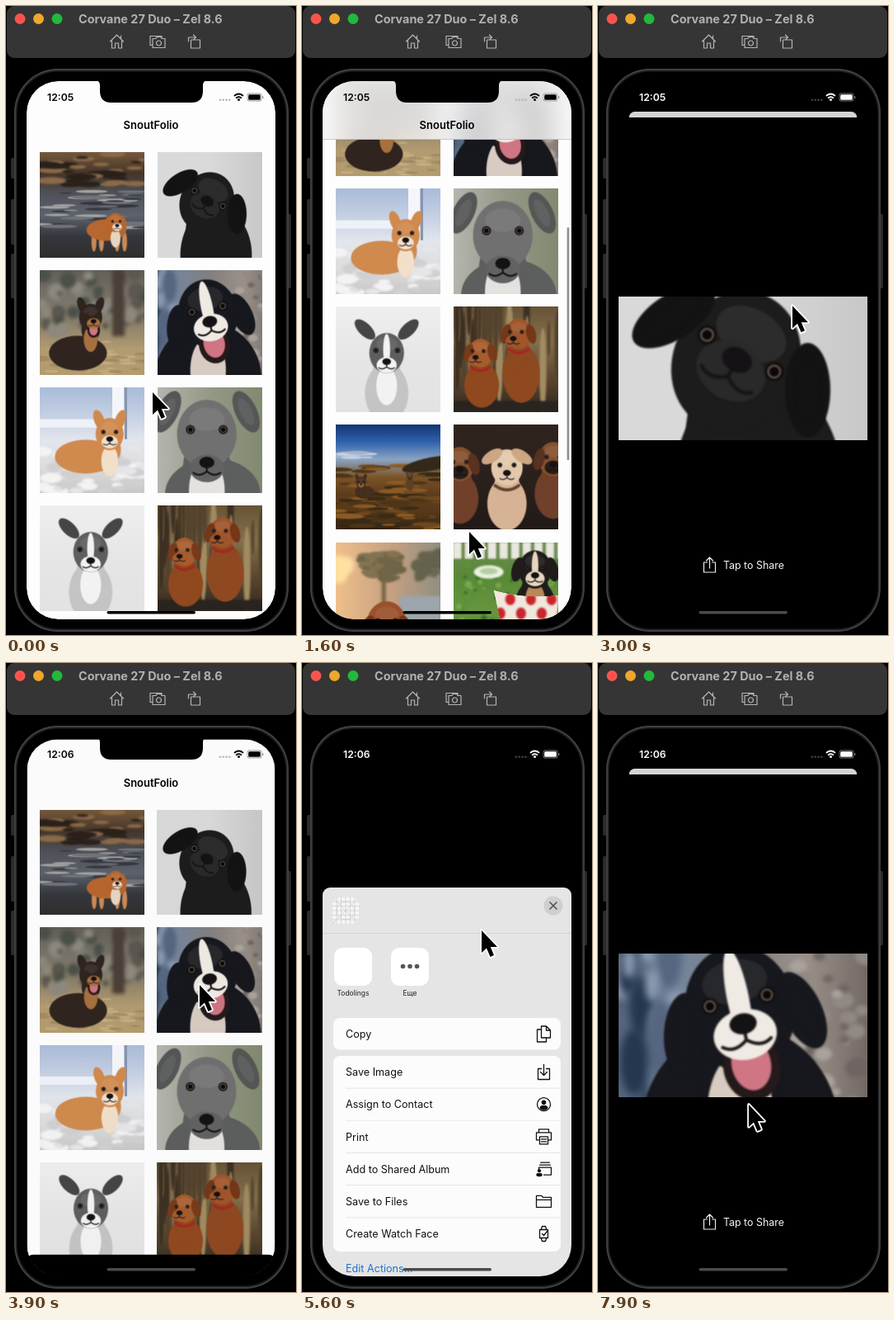
An HTML page with a canvas that plays this animation: 352 px wide and 762 px high, repeating every 8000 ms.

```html
<!DOCTYPE html>
<html lang="en">
<head>
<meta charset="utf-8">
<title>Dog gallery</title>
<style>
html, body { margin: 0; width: 100%; height: 100%; overflow: hidden; background: #000; }
canvas { display: block; width: 352px; height: 762px; }
</style>
</head>
<body>
<canvas id="stage" width="352" height="762"></canvas>
<script>
const stage = document.getElementById('stage').getContext('2d');
let c = stage, unit = 1, seed = 1;

// Drawing helpers
const oval = (fill, x, y, rx, ry = rx, rot = 0) => {
  c.fillStyle = fill;
  c.beginPath();
  c.ellipse(x, y, rx, ry, rot, 0, 7);
  c.fill();
};
const rect = (fill, x, y, w, h, r = 0) => {
  c.fillStyle = fill;
  c.beginPath();
  c.roundRect(x, y, w, h, r);
  c.fill();
};
const clipTo = (x, y, w, h, r) => {
  c.beginPath();
  c.roundRect(x, y, w, h, r);
  c.clip();
};
const line = (color, width, d, x = 0, y = 0) => {
  c.save();
  c.translate(x, y);
  c.strokeStyle = color;
  c.lineWidth = width;
  c.lineJoin = c.lineCap = 'round';
  c.stroke(new Path2D(d));
  c.restore();
};
const text = (str, x, y, size, color, weight = 400, align = 'left') => {
  c.font = `${weight} ${size}px Inter, sans-serif`;
  c.textAlign = align;
  c.fillStyle = color;
  c.fillText(str, x, y);
};
const blur = n => c.filter = n ? `blur(${n * unit}px)` : 'none';
const random = () => (seed = seed * 16807 % 2147483647) / 2147483647;

// Photo parts, on a square with sides of SIDE
const SIDE = 127;
const gradient = (x, y, colors) => {
  const g = c.createLinearGradient(0, 0, x, y);
  colors.forEach((k, i) => g.addColorStop(i / (colors.length - 1), k));
  rect(g, 0, 0, SIDE, SIDE);
};
const down = (...colors) => gradient(0, SIDE, colors);
const across = (...colors) => gradient(SIDE, 0, colors);
const scatter = (n, colors, top, height, rx, ry = rx, left = 0, width = SIDE) => {
  blur(Math.min(rx, ry) / 3);
  for (let i = 0; i < n; i++) {
    const size = .5 + random();
    oval(colors[i % colors.length], left + random() * width, top + random() * height, rx * size, ry * size);
  }
};

// A dog seen from the front, measured in head radii around the head's centre
const pricked = { earX: .75, earY: -1, earRot: .35 };
const lying = [-1.8, 2.4, 2.5, 1.4];
function dog(x, y, r, coat, look = {}) {
  const {
    body = [0, 2.3, 1.25, 1.7], bodyCoat = coat, chest = bodyCoat, muzzle = coat, ear = coat, inner = ear,
    earX = .95, earY = 0, earRot = -.25, eyeX = .45, noseY = .35, turn = 0, tilt = 0, blaze, tongue, collar
  } = look;
  c.save();
  blur(.5);
  c.translate(x, y);
  c.scale(r, r);
  oval(bodyCoat, ...body);
  oval(bodyCoat, 0, 1.1, .8, 1);
  oval(chest, 0, 1.9, .6, 1.1);
  if (collar) line(collar, .2, 'M-.75 1.15Q0 1.7 .75 1.15');
  c.rotate(tilt);
  oval(coat, 0, 0, 1, 1.15);
  for (const s of [-1, 1]) {
    oval(ear, s * earX, earY, .36, .75, s * earRot);
    oval(inner, s * earX, earY, .2, .5, s * earRot);
  }
  oval('#ffffff12', 0, -.5, .6, .4);
  if (blaze) oval(blaze, turn * .6, -.2, .2, .9);
  if (tongue) {
    oval('#24191b', turn, noseY + .8, .52, .62);
    oval('#cf7583', turn, noseY + .75, .36, .48);
  }
  oval(muzzle, turn, noseY + .2, .58, .46);
  line('#1a1515', .06, 'M0 0V.3Q-.25 .5 -.45 .35M0 .3Q.25 .5 .45 .35', turn, noseY);
  oval('#141214', turn, noseY, .25, .19);
  for (const s of [-1, 1]) {
    oval('#100d0c', s * eyeX + turn * .5, -.15, .15);
    oval('#6a5a50', s * eyeX + turn * .5, -.15, .11);
    oval('#0a0808', s * eyeX + turn * .5, -.15, .08);
  }
  c.restore();
}

const photos = [
  () => { // bulldog by the sea
    down('#75593c', '#453629', '#50525a', '#5d626c', '#35373d', '#302e2d');
    scatter(30, ['#2a211b', '#8b6a48'], 0, 42, 13, 3);
    scatter(36, ['#a4a3a2', '#34373e', '#6f737b'], 46, 45, 16, 1.5);
    for (const x of [66, 75, 94, 103]) oval('#c98a58', x, 108, 3, 12);
    dog(92, 85, 10, '#b8662f', { muzzle: '#eee2d3', chest: '#e6d5c2', body: [-1.1, .9, 2.4, 1.3], turn: .2 });
  },
  () => { // pug
    across('#d9d9d9', '#dadada', '#c8c8c8');
    dog(60, 60, 32, '#1c1c1c', { tilt: .5, eyeX: .61, noseY: -.03, muzzle: '#292929', ear: '#131313',
      earX: 1.22, earY: -.15, earRot: -.5, body: [.35, 2, 1.35, 1.8] });
  },
  () => { // shepherd
    down('#625f57', '#77736a', '#8a8069', '#b29b72', '#b39c6d');
    scatter(50, ['#4b5048', '#8d897e', '#5d5850'], 0, 75, 7);
    rect('#4b4037', 88, 0, 15, 80);
    scatter(50, ['#c4ad80', '#a18a62'], 85, 40, 8, 1.5);
    dog(62, 57, 14, '#30241f', { ...pricked, muzzle: '#a87142', chest: '#a6703f', tongue: true, turn: .25,
      body: [-1.1, 3.1, 2.5, 1.5] });
  },
  () => { // collie
    across('#4c5c74', '#76869c', '#817f80', '#9b9189', '#736a66');
    scatter(26, ['#25374f', '#8c9bb2', '#566680'], 0, SIDE, 6, 14, 0, 45);
    scatter(50, ['#aaa29d', '#6f6663', '#918983'], 0, SIDE, 4, 3, 88, 40);
    dog(62, 55, 28, '#17181d', { tilt: -.2, blaze: '#f0eae5', muzzle: '#f0eae5', chest: '#d7cbc2', tongue: true,
      eyeX: .53, noseY: .28, earX: 1.1, earY: .25, body: [0, 2.2, 1.8, 1.9] });
  },
  () => { // shiba
    down('#a9bcda', '#c3cfe2', '#e3e6ed', '#ddddde', '#c9c8c9');
    rect('#eef1f8', 0, 38, 88, 10);
    rect('#f5f6fa', 88, 0, 14, 64);
    rect('#8995ac', 103, 0, 3, 62);
    scatter(60, ['#f4f3f4', '#d0cfd1', '#e6e5e8'], 72, 55, 9, 4);
    dog(85, 56, 17, '#d08a4e', { ...pricked, muzzle: '#f2dfca', chest: '#f2dfca', body: [-1.7, 1.6, 2.2, 1.2] });
  },
  () => { // grey dog
    across('#b5b5ae', '#949987', '#818a70');
    dog(60, 56, 36, '#707070', { bodyCoat: '#5d5e5e', chest: '#e4e2df', ear: '#555656', inner: '#606161',
      muzzle: '#626262', earX: 1.32, earY: -.75, earRot: -.45, eyeX: .55, noseY: .95, body: [.2, 2, 1.6, 1.2] });
  },
  () => { // grey and white dog
    down('#efefef', '#e6e6e6', '#e3e3e3');
    dog(62, 56, 21, '#5e5e5e', { bodyCoat: '#c4c4c4', chest: '#f2f2f2', blaze: '#f2f2f2', muzzle: '#f2f2f2',
      ear: '#464646', earX: 1.25, earY: -1.35, earRot: .8, eyeX: .62, noseY: .5 });
  },
  () => { // two red dogs
    down('#695338', '#84704d', '#5c482f', '#312820');
    scatter(34, ['#3d3022', '#a18b61', '#54432d'], 0, 80, 3, 35);
    rect('#29241f', 0, 114, SIDE, 13);
    dog(79, 33, 16, '#a0552a', { bodyCoat: '#8e4921', ear: '#743818', collar: '#a52822', turn: -.4, body: [.2, 3, 1.4, 2.2] });
    dog(33, 56, 15, '#a75c2d', { bodyCoat: '#90491f', ear: '#783b1b', collar: '#a52822', turn: -.4, body: [.1, 2.6, 1.4, 1.8] });
  },
  () => { // hill field
    down('#143572', '#2f62ad', '#8ba4c4', '#7c5427', '#5d3d1d', '#583919', '#30230f');
    scatter(8, ['#c9d3df', '#9fb4d0'], 34, 8, 14, 2, 0, 50);
    scatter(90, ['#392a16', '#8c5b25', '#6f481f', '#4c3519'], 50, 77, 13, 2);
    oval('#33281a', 115, 48, 35, 8, -.2);
    dog(31, 70, 6, '#452f1e', { ...pricked, muzzle: '#a9743d', body: [.7, 2, 2, 1.3] });
    dog(90, 64, 4, '#5b4127', pricked);
  },
  () => { // three dogs
    down('#30241e', '#2b211c', '#211a17');
    const brown = { bodyCoat: '#70402a', muzzle: '#281d18', ear: '#5a3221' };
    dog(8, 48, 18, '#85512f', brown);
    dog(121, 42, 18, '#85512f', brown);
    dog(65, 52, 19, '#e3c8ab', { bodyCoat: '#d5b394', ear: '#cda783', earY: -.7, earRot: -1, collar: '#674332' });
  },
  () => { // dog and palms
    across('#efc08c', '#c9a282', '#918e81');
    scatter(6, ['#ffe1a2'], 22, 32, 9, 9, 0, 14);
    scatter(36, ['#827451', '#706547'], 14, 30, 8, 4, 34, 45);
    scatter(24, ['#65634e'], 10, 34, 6, 5, 98, 30);
    rect('#706547', 56, 30, 5, 48);
    rect('#9ca6ac', 78, 65, 49, 38);
    scatter(60, ['#59603b', '#706f4e', '#48502d'], 100, 27, 9, 4);
    dog(62, 99, 24, '#9a512b', { ear: '#6f371c', muzzle: '#b0703f', bodyCoat: '#874522', earY: .3 });
  },
  () => { // puppy in a cup
    down('#6b8851', '#598a37', '#67963f', '#4c7f2e');
    scatter(90, ['#78a852', '#3f6e28', '#5d9038'], 26, 100, 3);
    for (let x = 0; x < SIDE; x += 14) rect('#e9e7df', x, 0, 10, 20);
    oval('#edf0e4', 43, 36, 18, 8);
    oval('#b5cfa0', 43, 35, 11, 4);
    dog(99, 33, 20, '#201c1c', { blaze: '#e7d6bd', muzzle: '#e7d6bd', chest: '#b98758', earX: 1.05 });
    c.beginPath();
    c.moveTo(49, 58);
    c.quadraticCurveTo(87, 69, 128, 64);
    c.lineTo(121, SIDE);
    c.lineTo(64, SIDE);
    c.clip();
    rect('#f0e7dd', 0, 0, SIDE, SIDE);
    for (let i = 0; i < 16; i++) oval('#c9262c', 44 + i % 4 * 25 + (i >> 2) % 2 * 13, 69 + (i >> 2) * 17, 6, 7);
  },
  () => { // two puppies
    down('#527449', '#6d8c57', '#7d9355', '#83934b', '#718448');
    scatter(90, ['#d9782f', '#8a9a4c', '#c9692c'], 76, 50, 2);
    for (const x of [44, 85])
      dog(x, 51, 15, '#e0cba2', { bodyCoat: '#d8c197', ear: '#bd9967', muzzle: '#ecdcbc', tongue: true });
  },
  () => { // french bulldog
    down('#4f7244', '#60983c', '#4e8d32', '#86a06b');
    scatter(30, ['#3c6f2b', '#7fae57', '#314b35'], 0, 105, 12);
    rect('#9fb3c6', 0, 114, SIDE, 13);
    dog(77, 55, 24, '#3b393a', { ...pricked, tilt: .12, earX: .95, earY: -1.2, inner: '#c59b9a', blaze: '#eeece9',
      muzzle: '#8f8b89', bodyCoat: '#dfdedb', tongue: true, collar: '#ba292d', eyeX: .6, noseY: .15, body: [.1, 2.2, 1.6, 1.1] });
    oval('#eeece9', 44, 114, 11, 7);
  },
  () => { // black and tan dog
    down('#fcfcfc', '#f4f4f4', '#eee');
    dog(59, 42, 24, '#252326', { muzzle: '#a9653b', chest: '#6d442e', earX: 1.05, earY: .2 });
  }
];

// Photos that open full width are drawn larger
const PUG = 1, COLLIE = 3, WIDE = 604;
const pictures = photos.map((paint, i) => {
  const pic = document.createElement('canvas');
  const px = pic.width = pic.height = i === PUG || i === COLLIE ? WIDE : SIDE * 2;
  c = pic.getContext('2d');
  unit = px / SIDE;
  seed = i * 991 + 7;
  c.scale(unit, unit);
  paint();
  return { pic, px, inset: i === COLLIE ? px * .11 : 0 };
});
c = stage;
unit = 1;

// Timelines: [time, values, easing towards this key]
const linear = u => u, drive = u => u * u, settle = u => 1 - (1 - u) ** 3;
const smooth = u => u * u * (3 - 2 * u);
const at = (keys, t) => {
  const i = keys.findIndex(k => k[0] > t);
  if (i < 0) return keys[keys.length - 1][1];
  if (!i) return keys[0][1];
  const [t0, from] = keys[i - 1], [t1, to, ease = smooth] = keys[i];
  const u = ease((t - t0) / (t1 - t0));
  return from.map((v, n) => v + (to[n] - v) * u);
};
const scrollKeys = [[0, [0]], [500, [485], linear], [900, [611], settle], [1250, [611]],
  [1600, [241], drive], [1950, [0], settle]];
const detailKeys = [[2350, [0]], [2850, [1], settle], [3350, [1]], [3650, [.82], drive],
  [4050, [0], settle], [4150, [0]], [4600, [1], settle]];
const shareKeys = [[5000, [0]], [5500, [1], settle], [6400, [1]], [6850, [0], settle]];
const cursorKeys = [[0, [178, 468]], [500, [152, -17], linear], [1250, [195, 267]], [1600, [203, 637], drive],
  [2250, [245, 250]], [2950, [236, 367]], [3350, [236, 281]], [3650, [235, 390], drive], [4350, [235, 390]],
  [5000, [180, 676]], [5550, [218, 324]], [5900, [218, 324]], [6400, [304, 294]], [7200, [183, 535]]];

function drawPhotos(scroll) {
  pictures.forEach(({ pic, px, inset }, i) => {
    const y = 177 + (i >> 1) * 142.7 - scroll, part = px - inset * 2;
    if (y > -107 && y < 743) c.drawImage(pic, inset, inset, part, part, 40.5 + i % 2 * 143, y, 127.5, 127.5);
  });
}

function drawGallery(scroll, p, t) {
  c.save();
  c.translate(176, 91 + 37 * p);
  c.scale(1 - .083 * p, 1 - .083 * p);
  c.translate(-176, -91);
  clipTo(25, 91, 302, 652, 38 - 30 * p);
  rect('#fdfdfd', 25, 91, 302, 652);
  drawPhotos(scroll);
  if (scroll > 1) {
    c.save();
    clipTo(25, 91, 302, 70.5, 0);
    rect('#fdfdfd', 25, 91, 302, 71);
    blur(16);
    drawPhotos(scroll);
    blur(0);
    rect('rgba(250,250,250,.8)', 25, 91, 302, 71);
    c.restore();
    rect('#bdbdbd', 25, 161, 302, .7);
  }
  if (t < 2150) {
    c.globalAlpha = Math.min(1, t / 100, (2150 - t) / 200);
    rect('#8d8d8d', 321.7, 162.5 + scroll * .4385, 2.5, 282, 1.2);
    c.globalAlpha = 1;
  }
  text('SnoutFolio', 176, 149, 13, '#000', 600, 'center');
  rect(`rgba(0,0,0,${.16 * p})`, 25, 91, 302, 652);
  c.restore();
}

function drawDetail(p, { pic }) {
  const dy = 608 * (1 - p);
  rect('#000', 25, 135 + dy, 302, 640, [8, 8, 0, 0]);
  c.drawImage(pic, 0, 128, WIDE, 348, 25, 352 + dy, 302, 174);
  line('#eee', 1.2, 'M-3 -3H-7V9H7V-3H3M0 4V-9M-4 -5L0 -9L4 -5', 135.5, 677 + dy);
  text('Tap to Share', 152, 682 + dy, 12.4, '#f4f4f4');
}

const actions = [
  ['Copy', 'M-3 -9H3L8 -4V5H-3ZM3 -9V-4H8M-3 -5H-8V10H3V5'],
  ['Save Image', 'M-3 -4H-7V9H7V-4H3M0 -9V4M-4 0L0 4L4 0'],
  ['Assign to Contact', 'M8 0A8 8 0 1 1 -8 0A8 8 0 1 1 8 0'],
  ['Print', 'M-5 4H-9V-5H9V4H5M-6 -5V-9H6V-5M-5 0H5V9H-5ZM-3 3H3M-3 6H3'],
  ['Add to Shared Album', 'M-4 -8H7M-5 -5H8M-6 1V-2H9V7H0'],
  ['Save to Files', 'M-9 7V-7H-3L-1 -5H9V7ZM-9 -2H9'],
  ['Create Watch Face', 'M-5 -5H5V5H-5ZM-3 -6L-2 -9H2L3 -6M-3 6L-2 9H2L3 6M-2 0L0 2L4 -3']
];
const drawPerson = (x, y, s) => {
  oval('#111', x, y - 2.5 * s, 2.8 * s);
  oval('#111', x, y + 4 * s, 5 * s, 3 * s);
};

function drawShare(q) {
  c.save();
  c.translate(0, 472 * (1 - q));
  rect('#e5e5e5', 25, 272, 302, 480, [9, 9, 0, 0]);
  rect('#f5f5f5', 37, 284, 32, 32, 7);
  for (let i = 5; i < 32; i += 5.5) line('#c4c4c4', .6, `M${i} 0V32M0 ${i}H32`, 37, 284);
  line('#c4c4c4', .6, 'M0 0L32 32M32 0L0 32M27 16A11 11 0 1 1 5 16A11 11 0 1 1 27 16', 37, 284);
  oval('#cfcfcf', 305, 294, 11.5);
  line('#555', 1.7, 'M-4 -4L4 4M4 -4L-4 4', 305, 294);
  rect('#cecece', 25, 327, 302, .8);
  ['Todolings', 'Еще'].forEach((label, i) => {
    rect('#fff', 39 + i * 69, 345, 46, 46, 10);
    text(label, 62 + i * 69, 403, 8.5, '#222', 400, 'center');
  });
  for (const dx of [-8.5, 0, 8.5]) oval('#555', 131 + dx, 367.5, 2.8);
  rect('#fcfcfc', 38, 430, 276, 38.5, 8);
  rect('#fcfcfc', 38, 476, 276, 237, 8);
  actions.forEach(([label, icon], i) => {
    const y = i ? 456.3 + 39.2 * i : 449;
    text(label, 53, y + 4.7, 12.6, '#111');
    line('#111', 1.3, icon, 293.5, y);
    if (i > 1) rect('#dedede', 53, y - 20, 261, .7);
  });
  drawPerson(293.5, 534.7, 1);
  drawPerson(288, 617, .75);
  text('Edit Actions…', 53, 738, 12.6, '#1d72ce');
  c.restore();
}

function drawStatus(t, dark) {
  const ink = dark ? '#fff' : '#000', dim = dark ? '#777' : '#999';
  text(t < 3500 ? '12:05' : '12:06', 50, 115, 12.2, ink, 600);
  for (let i = 0; i < 4; i++) oval(dark ? '#444' : '#b5b5b5', 260 + i * 3.8, 113.7, 1.3);
  line(ink, 1.8, 'M-5 -2Q0 -6 5 -2M-2.8 .8Q0 -1.5 2.8 .8', 282.5, 110.5);
  oval(ink, 282.5, 113.6, 1.5);
  rect(dim, 292.6, 105.6, 17.8, 9.8, 2.6);
  rect(dark ? '#000' : '#fdfdfd', 293.4, 106.4, 16.2, 8.2, 2);
  rect(ink, 294.2, 107.2, 14.6, 6.6, 1.5);
  rect(dim, 311, 109, 1.4, 3.2, 1);
}

function drawFrame() {
  rect('#000', 0, 0, 352, 762);
  rect('#353535', 1, 0, 350, 63, 9);
  ['#f9534e', '#efa72c', '#23b83d'].forEach((k, i) => oval(k, 17 + i * 22.5, 15.5, 6.5));
  text('Corvane 27 Duo – Zel 8.6', 88, 20.5, 14.4, '#b1b1b1', 700);
  line('#b4b4b4', 1.2, 'M-8 0L0 -8L8 0M-6 -1V8H-2V2H2V8H6V-1M5 -4V-7', 134.5, 43);
  line('#b4b4b4', 1.2, 'M-6 4H-9V-7H5V-4M-6 -4H-2L-1 -6H4L5 -4H9V7H-6ZM4.5 1.5A3 3 0 1 1 -1.5 1.5A3 3 0 1 1 4.5 1.5', 184, 43.5);
  line('#b4b4b4', 1.2, 'M-4 -2H7V8H-4ZM-7 0V-5H2M-1 -8L2 -5L-1 -2', 228.5, 43);
  for (const [x, y, h] of [[6, 184, 25], [6, 234, 55], [6, 300, 54], [341, 252, 90]]) rect('#2b2b2b', x, y, 5, h, 1.5);
  ['#444', '#222', '#000'].forEach((k, i) => rect(k, 10 + i * 1.7, 76 + i * 1.7, 333 - i * 3.4, 682 - i * 3.4, 53 - i * 1.7));
}

function drawCursor(x, y) {
  const arrow = 'M0 0V27L6 21.5L10.5 32L15 30L10.8 20H19Z';
  line('#fff', 3.6, arrow, x, y);
  c.save();
  c.translate(x, y);
  c.fillStyle = '#000';
  c.fill(new Path2D(arrow));
  c.restore();
}

function draw(t) {
  const [scroll] = at(scrollKeys, t), [p] = at(detailKeys, t), [q] = at(shareKeys, t);
  drawFrame();
  c.save();
  clipTo(25, 91, 302, 652, 38);
  c.globalAlpha = 1 - q;
  drawGallery(scroll, p, t);
  c.globalAlpha = 1;
  if (p > 0) drawDetail(p, pictures[t < 4100 ? PUG : COLLIE]);
  if (q > 0) drawShare(q);
  c.restore();

  c.fillStyle = '#000';
  c.fill(new Path2D('M109 90Q114 91 114 96V103Q114 117 128 117H225Q239 117 239 103V96Q239 91 244 90Z'));
  drawStatus(t, p > .5);
  rect(p > .02 ? '#4b4b4b' : '#000', 122.5, 733, 107.5, 3.6, 1.8);
  drawCursor(...at(cursorKeys, t));
}

let start;
function tick(now) {
  start ??= now;
  draw((now - start) % 8000);
  requestAnimationFrame(tick);
}
requestAnimationFrame(tick);
</script>
</body>
</html>
```
